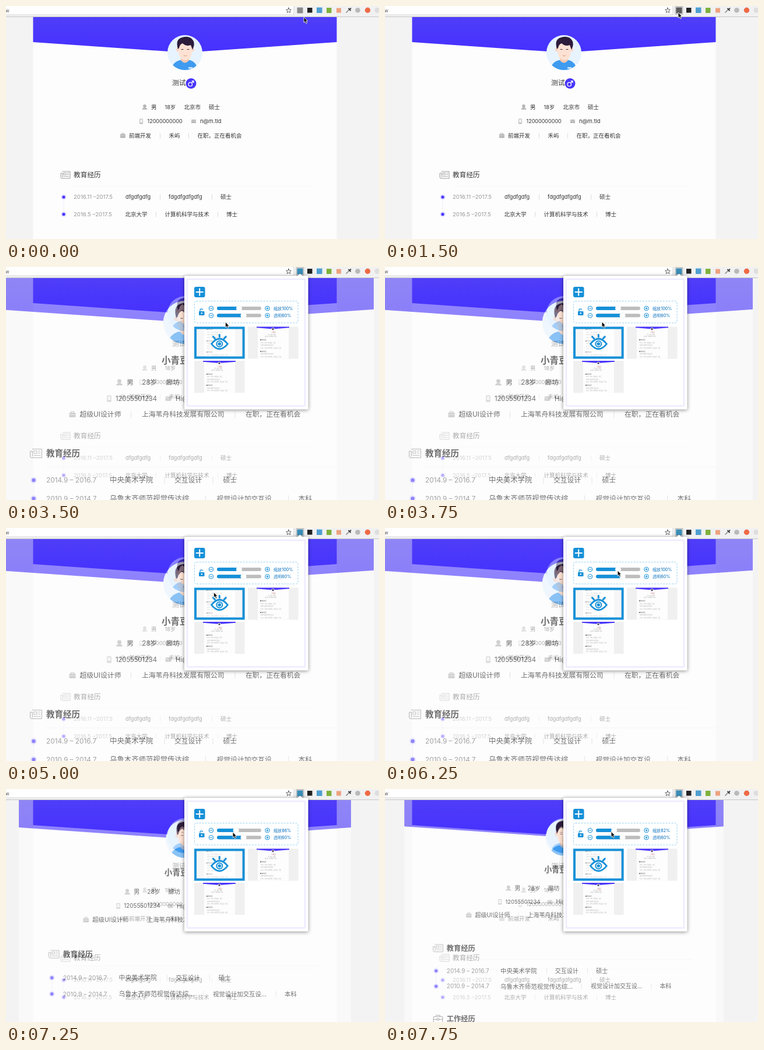
An HTML page that plays this animation: 640x400 px, repeating every 8000 ms.

```html
<!DOCTYPE html>
<html lang="zh-CN">
<head>
<meta charset="utf-8">
<style>
  html, body { margin: 0; width: 100%; height: 100%; overflow: hidden; background: #f3f3f3; }
  svg { display: block; width: 640px; height: 400px; }
  text { font-family: Inter, "Noto Sans CJK SC", "Noto Sans CJK", sans-serif; white-space: pre; }
  #popup { filter: drop-shadow(0 1px 3px rgba(0, 0, 0, .45)); }
</style>
</head>
<body>
<svg id="stage" viewBox="0 0 640 400"></svg>
<script>
const PURPLE = '#4936fb', BLUE = '#1590d8';

// y is the vertical middle of the text
const text = (x, y, str, size = 9.5, fill = '#333', extra = '') =>
  `<text x="${x}" y="${y + size * .36}" font-size="${size}" fill="${fill}" ${extra}>${str}</text>`;
const rect = (x, y, w, h, fill, extra = '') =>
  `<rect x="${x}" y="${y}" width="${w}" height="${h}" fill="${fill}" ${extra}/>`;
const circle = (x, y, r, fill, extra = '') =>
  `<circle cx="${x}" cy="${y}" r="${r}" fill="${fill}" ${extra}/>`;
const path = (d, fill = 'none', extra = '') => `<path d="${d}" fill="${fill}" ${extra}/>`;
const line = (d, color, width = 1) =>
  path(d, 'none', `stroke="${color}" stroke-width="${width}" stroke-linecap="round" stroke-linejoin="round"`);
const at = (x, y, k, body) => `<g transform="translate(${x} ${y}) scale(${k})">${body}</g>`;
const bar = (x, y, k = 1) => rect(x, y - 4.5 * k, .8 * k, 9 * k, '#d4d4d4');

const icons = {
  person: circle(0, -1.6, 2.8, '#b5b5b5') + path('M-4.5 4.2Q-4 1 0 1Q4 1 4.5 4.2Z', '#b5b5b5'),
  phone: rect(-3, -4.5, 6, 9, '#c0c0c0', 'rx="1"') + rect(-2, -3.3, 4, 5.4, '#f2f2f2'),
  mail: rect(-4, -3, 8, 6, '#b5b5b5', 'rx=".6"') + line('M-4 -2L0 .6L4 -2', '#f4f4f4', .7),
  bag: rect(-4.5, -2.5, 9, 6.5, '#b5b5b5', 'rx="1"') +
    line('M-2 -2.6V-4H2V-2.6', '#b5b5b5') + line('M-4.5 .3H4.5', '#eee', .6),
  news: line('M-5 -6H8V6H-6Q-8 6 -8 4V-3H-5V4', '#888', .8) +
    rect(-3, -3.5, 4, 3.5, 'none', 'stroke="#888" stroke-width=".7"') +
    line('M3 -3.3H6M3 -.5H6M-3 2.7H6', '#888', .7),
  work: rect(-7.5, -4, 15, 9.5, 'none', 'rx="1" stroke="#777"') +
    line('M-3 -4V-6.3H3V-4M-7.5 .5H-1.5M1.5 .5H7.5M-1.5 -.8H1.5V2H-1.5Z', '#777', .9),
  dot: circle(0, 0, 4.6, '#e0dcff') + circle(0, 0, 2.6, PURPLE),
  male: circle(0, 0, 9, PURPLE) + circle(-1.2, 1.4, 3.2, 'none', 'stroke="#fff" stroke-width="1.3"') +
    line('M1.2 -1L4.4 -4.2M1.6 -4.4H4.5V-1.5', '#fff', 1.3),
  avatar: circle(0, 0, 30, '#e7f3ff') + `<g clip-path="url(#face)">` +
    path('M-23 30Q-22 17 -9 13L9 13Q20 16 22 30Z', '#3f9bf0') +
    path('M-7 6H7V13Q0 22 -7 13Z', '#f6c9b3') +
    circle(-12, -5, 3, '#f9d5c3') + circle(13, -5, 3, '#f9d5c3') +
    path('M-11 -16H12V-3Q11 13 .5 13Q-10 12 -11 -3Z', '#fde2d3') +
    path('M-12 -6Q-17 -23 -5 -26Q8 -30 14 -21Q18 -15 13 -5L10 -13Q2 -10 -4 -16Q-9 -14 -10 -8Z', '#2c1c3b') +
    line('M-6 -5.5H-3M4 -5.5H7', '#3b2735', 1) + line('M-2 5Q.5 7 3 5', '#d98777', .9) +
    rect(6, 25, 7, 2.5, '#d8ecff') + '</g>'
};
const icon = (name, x, y, k = 1) => at(x, y, k, icons[name]);

// Resume card around the centre line x = 307
const card = (half, edge, tip, k) =>
  rect(307 - half, 18, half * 2, 700, '#fdfdfd') +
  path(`M${307 - half} 18H${307 + half}V${edge}L307 ${tip}L${307 - half} ${edge}Z`, 'url(#head)') +
  icon('avatar', 307, tip, k);

const basePage = () => card(260.5, 62, 80, 1) +
  text(285, 132, '测试', 11.7) + icon('male', 317.5, 133) +
  icon('person', 238, 173.5) + text(249, 173.5, '男') + text(272.5, 173.5, '18岁', 9.2) +
  text(305.5, 173.5, '北京市') + text(348, 173.5, '硕士') +
  icon('phone', 232, 198) + text(242.5, 198, '12000000000', 9) +
  icon('mail', 322, 198) + text(333, 198, 'n@m.tld', 9.4) +
  icon('bag', 200.5, 222.5) + text(211, 222.5, '前端开发') + bar(264, 222.5) +
  text(279.5, 222.5, '禾屿') + bar(313, 222.5) + text(328.5, 222.5, '在职，正在看机会') +
  icon('news', 102, 290) + text(116, 290, '教育经历', 11.7) +
  line('M116 309H522', '#f5f5f5', .8) + line('M99 333V352', '#eceafa', .8) +
  icon('dot', 99, 328) + text(116, 328, '2016.11 –2017.5', 9.6, '#999') +
  text(205, 328, 'dfgdfgdfg', 9.2) + bar(264, 328) +
  text(279, 328, 'fdgdfgdfgdfg', 9.2) + bar(353, 328) + text(368, 328, '硕士') +
  icon('dot', 99, 357.5) + text(116, 357.5, '2016.5 –2017.5', 9.6, '#999') +
  text(204.5, 357.5, '北京大学') + bar(257, 357.5) +
  text(272.5, 357.5, '计算机科学与技术') + bar(363, 357.5) + text(378, 357.5, '博士');

const overlayPage = () => {
  const ink = '#111', K = 1.24;
  const put = (x, y, str, size = 11.8) => text(x, y, str, size, ink);
  const heading = (y, str) => text(69, y, str, 14.5, ink, 'font-weight="600"');
  const date = (y, str) => icon('dot', 47.5, y, K) + text(69, y, str, 11.8, '#666');
  return card(324, 72.7, 95, K) +
    text(267, 160.5, '小青豆', 15.5, ink, 'font-weight="600"') + icon('male', 327, 161, K) +
    icon('person', 194.5, 198, K) + put(207, 198, '男') + put(233.5, 198, '28岁', 11.4) + put(274.5, 198, '廊坊') +
    icon('phone', 177, 226, K) + put(188, 226, '12055501234', 11.2) +
    icon('mail', 278.5, 226, K) + put(291, 226, 'Hi@me.tld', 11.4) +
    icon('bag', 114, 253, K) + put(126.5, 253, '超级UI设计师') + bar(214, 253, K) +
    put(233, 253, '上海苇舟科技发展有限公司') + bar(392.5, 253, K) + put(411, 253, '在职，正在看机会') +
    icon('news', 51.5, 320, K) + heading(320, '教育经历') +
    line('M69 343H568', '#f4f4f4') + line('M47.5 372V391', '#e4e1fa', .8) +
    date(366, '2014.9 – 2016.7') + put(178, 366, '中央美术学院', 12.4) + bar(271.5, 366, K) +
    put(289, 366, '交互设计') + bar(354.5, 366, K) + put(372.5, 366, '硕士') +
    date(397.5, '2010.9 – 2014.7') + put(178, 397.5, '乌鲁木齐师范视觉传达综...', 12.4) + bar(342, 397.5, K) +
    put(361.5, 397.5, '视觉设计加交互设...') + bar(484, 397.5, K) + put(501.5, 397.5, '本科') +
    icon('work', 51.5, 464, K) + heading(464, '工作经历');
};

const toolbar = () => rect(0, 0, 640, 18, '#f1f1f1') + rect(0, 0, 494, 15, '#fff') +
  rect(0, 14.6, 494, .8, '#cfcfcf') + rect(493.5, 0, .8, 15, '#cfcfcf') + rect(0, 18, 640, 1, '#c6c6c6') +
  text(-1, 8, 'w', 8, '#555') +
  line('M485 3L486.2 6L489.4 6.2L487 8.3L487.8 11.4L485 9.7L482.2 11.4L483 8.3L480.6 6.2L483.8 6Z', '#555', .9) +
  rect(497.5, 0, 14, 15, '#c9c9c9', 'id="press" rx="1"') + rect(499.5, 2.5, 10, 10, '#8b8b8b', 'id="badge" rx="1"') +
  rect(517, 3, 8.5, 8.5, '#222') + rect(533, 2.5, 9.5, 9.5, '#4f9fd0') + rect(550, 3, 8.5, 9, '#7fb13c') +
  rect(567, 3.5, 8, 8, '#eda27f') +
  line('M584 11L588.5 6.5', '#888', 1.6) + line('M588 4.5L591 7.5M589.5 6L591.5 4', '#444', 2) +
  circle(603.5, 7.3, 4.3, '#b9b9b9') + circle(620.5, 7.3, 4.7, '#ee6a45') + circle(637, 7.3, 4.5, '#dedede');

// Miniature resume, 86.5 x 55
const thumb = (x, y, withHead) => {
  const rows = ['2014 – 2016  美术学院   交互设计   硕士', '2010 – 2014  视觉设计   交互', '负责产品视觉与交互设计'];
  const tiny = (tx, ty, str) => text(tx, ty, str, 2, '#999');
  let body = rect(0, 0, 86.5, 55, '#f0f0f1') + rect(17, 0, 53, 55, '#fdfdfd');
  if (withHead) {
    body += path('M15 0H71V1.8L43 4L15 1.8Z', PURPLE) + circle(43, 4.5, 2.8, '#e3ecf8') + circle(43, 4, 1.5, '#4a3040') +
      text(40.2, 9.8, '小青豆', 2.5, '#b55') + tiny(35, 13.5, '男  28岁  廊坊') + tiny(29, 16.5, '设计师  苇舟科技  在职');
  }
  for (let i = 0, ty = withHead ? 23 : 5; ty < 54; i++, ty += i % 4 ? 4.5 : 6)
    body += i % 4 ? tiny(22, ty, rows[i * 7 % 3]) : text(21, ty, '■ 教育经历', 2.1, '#555');
  return at(x, y, 1, body);
};

const slider = (y, name) => {
  const ring = x => circle(x, y, 3.8, '#fff', `stroke="${BLUE}" stroke-width="1"`) + line(`M${x - 1.8} ${y}H${x + 1.8}`, BLUE);
  return ring(352) + ring(448.5) + line(`M448.5 ${y - 1.8}V${y + 1.8}`, BLUE) +
    rect(362, y - 3, 76, 6, '#bdbdbd', 'rx="3"') + rect(362, y - 3, 40, 6, BLUE, `id="${name}Fill" rx="3"`) +
    circle(400, y, 4.9, '#fff', `id="${name}Knob" stroke="#e4e4e4" stroke-width=".4"`) +
    text(459, y + .3, '', 7.1, '#1878c0', `id="${name}Label" font-weight="500"`);
};

const popup = () => path('M500.5 15.5L504.5 11.5L508.5 15.5Z', '#fff') +
  rect(306, 15, 212.5, 192, '#fff', 'id="outer" rx="1.5"') +
  rect(311, 21, 202, 180, '#fff', 'id="inner" rx="1" stroke="#edebff" stroke-width="2.4"') +
  rect(323, 34, 18.5, 18, BLUE, 'rx="3"') + line('M326.5 43H338M332.2 37.3V48.7', '#fff', 2) +
  '<g id="controls">' + rect(323.5, 58.5, 177.5, 37.5, '#fff', 'rx="3" stroke="#8ccbf0" stroke-width=".9" stroke-dasharray="3 2"') +
  rect(331, 76, 9.5, 7, BLUE, 'rx="1"') + line('M333 76V74Q333 71.8 335.3 71.8Q337 71.8 337.6 73.2', BLUE, 1.2) +
  circle(335.8, 79.3, 1.2, '#fff') + slider(71, 'zoom') + slider(83.3, 'alpha') + '</g>' +
  '<g id="thumbs">' + thumb(323, 65, false) + thumb(415, 65, true) + thumb(323, 123.5, true) + '<g id="chosen">' +
  rect(325, 67, 82.6, 51, 'rgba(255,255,255,.35)', `stroke="${BLUE}" stroke-width="4"`) +
  path('M352.5 94.5Q366.3 77 380.3 94.5Q366.3 112 352.5 94.5Z', '#fff', `stroke="${BLUE}" stroke-width="2.8"`) +
  circle(366.3, 94.5, 5, '#fff', `stroke="${BLUE}" stroke-width="2"`) + circle(366.3, 94.5, 2.8, BLUE) +
  line('M366.3 78.8V82.5M355.5 82L358.5 85.5M377.2 82L374.2 85.5', BLUE, 3) + '</g></g>';

document.getElementById('stage').innerHTML =
  `<defs><linearGradient id="head" x2="0" y2="1"><stop stop-color="#4f3ef8"/><stop offset="1" stop-color="#4530ff"/></linearGradient>
  <clipPath id="face"><circle r="30"/></clipPath></defs>` +
  rect(0, 0, 640, 400, '#f3f3f3') + basePage() + `<g id="overlay" opacity=".6">${overlayPage()}</g>` +
  toolbar() + `<g id="popup">${popup()}</g>` +
  path('M0 0V9.4L2.2 7.5L3.8 11L5.6 10.2L4 6.8H6.8Z', '#111', 'id="cursor" stroke="#fff" stroke-width=".8"');

// [time, value...]
const cursorKeys = [[0, 511, 19], [750, 503, 11], [1750, 503, 11], [2500, 394, 82], [2750, 385, 95], [3000, 385, 95],
  [3750, 372, 94], [4250, 328, 135], [4500, 328, 135], [5750, 399, 73], [6250, 399, 73], [7250, 389, 74], [7750, 388, 73]];
const zoomKeys = [[0, 100], [6250, 100], [7250, 86], [7750, 82]];

function sample(keys, t) {
  const i = keys.findIndex(k => k[0] > t);
  if (i < 0) return keys[keys.length - 1].slice(1);
  const a = keys[i - 1], b = keys[i], u = (t - a[0]) / (b[0] - a[0]);
  return a.slice(1).map((v, j) => v + (b[j + 1] - v) * u);
}

const $ = id => document.getElementById(id);
const set = (id, name, value) => $(id).setAttribute(name, value);
const show = (id, on) => { $(id).style.display = on ? '' : 'none'; };

function setSlider(name, x, label) {
  set(name + 'Fill', 'width', x - 362);
  set(name + 'Knob', 'cx', x);
  $(name + 'Label').textContent = label;
}

function draw(now) {
  const t = Math.floor(now % 8000 / 250) * 250; // four poses per second
  const open = t >= 1750, chosen = t >= 3000;
  const [zoom] = sample(zoomKeys, t), grow = chosen ? 37.5 : 0;
  const scale = 1 - (100 - zoom) * .0086;

  show('press', t >= 1500);
  set('badge', 'fill', chosen ? '#3a8eb8' : t >= 1500 ? '#5c5c5c' : '#8b8b8b');
  show('popup', open);
  show('controls', chosen);
  show('chosen', chosen);
  show('overlay', chosen);
  set('outer', 'height', 192 + grow);
  set('inner', 'height', 180 + grow);
  set('thumbs', 'transform', `translate(0 ${grow})`);
  set('overlay', 'transform', `translate(307 18) scale(${scale}) translate(-307 -18)`);
  setSlider('zoom', 362 + zoom * .38, `缩放${Math.round(zoom)}%`);
  setSlider('alpha', 407.6, '透明60%');
  set('cursor', 'transform', `translate(${sample(cursorKeys, t).join(' ')})`);
}

const start = performance.now();
(function tick() {
  draw(performance.now() - start);
  requestAnimationFrame(tick);
})();
</script>
</body>
</html>
```
